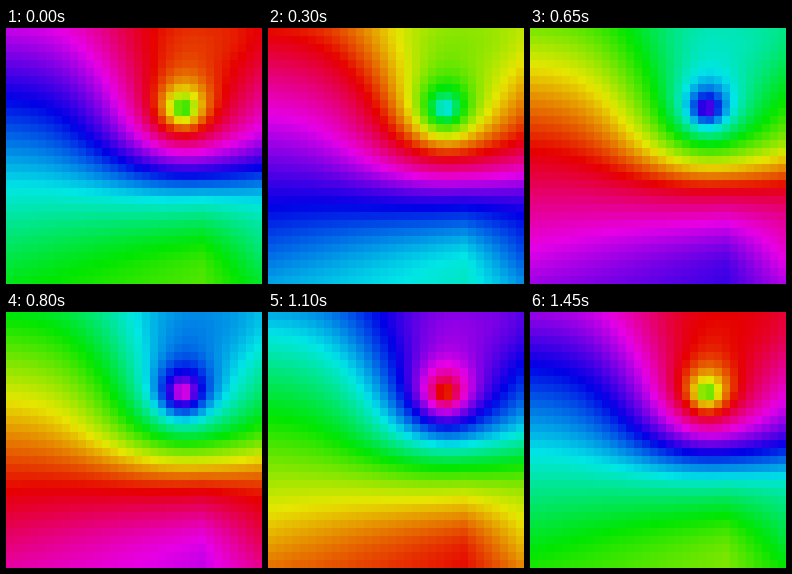
Recreate the animation shown at these times as an HTML page with a canvas. Size 320 px wide and 320 px high, loop 1500 ms.

```html
<!DOCTYPE html>
<html lang="en">
<head>
<meta charset="utf-8">
<title>Hue field</title>
<style>
  html, body { margin: 0; width: 100%; height: 100%; overflow: hidden; }
  canvas { display: block; width: 320px; height: 320px; }
</style>
</head>
<body>
<canvas id="stage" width="320" height="320"></canvas>
<script>
const ctx = document.getElementById('stage').getContext('2d');
const CELLS = 32, SIZE = 10;
const STEP_MS = 50, STEPS = 30;

// Falls from 1 towards 0 with distance; a higher power gives a flatter top.
const bump = (distance, width, power) =>
  Math.exp(-((Math.abs(distance) / width) ** power));

// Starting hue of a cell in degrees.
function baseHue(x, y) {
  const slope = 289 - 6.3 * y + 0.034 * y * y;
  const plateau = 84 * bump(x - 25, 14.3, 2.6) * bump(y - 7, 11.5, 4);
  const peak = 178 * bump(Math.hypot(x - 21.6, y - 9.6), 3.4, 1);
  const wedge = Math.min(x / 24, (30 - x) / 6);
  const valley = 32 * wedge * bump(y - 28.5, 6.1, 2);
  return slope + plateau + peak - valley;
}

const hues = Array.from({ length: CELLS * CELLS },
  (_, i) => baseHue(i % CELLS, Math.floor(i / CELLS)));

function draw(step) {
  const shift = step * 360 / STEPS;
  hues.forEach((hue, i) => {
    ctx.fillStyle = `hsl(${((hue + shift) % 360).toFixed(1)}, 100%, 45%)`;
    ctx.fillRect(i % CELLS * SIZE, Math.floor(i / CELLS) * SIZE, SIZE, SIZE);
  });
}

let start, shown = 0;
function tick() {
  const now = performance.now();
  start ??= now;
  const step = Math.floor((now - start) / STEP_MS) % STEPS;
  if (step !== shown) draw(shown = step);
  requestAnimationFrame(tick);
}

draw(0);
requestAnimationFrame(tick);
</script>
</body>
</html>
```
